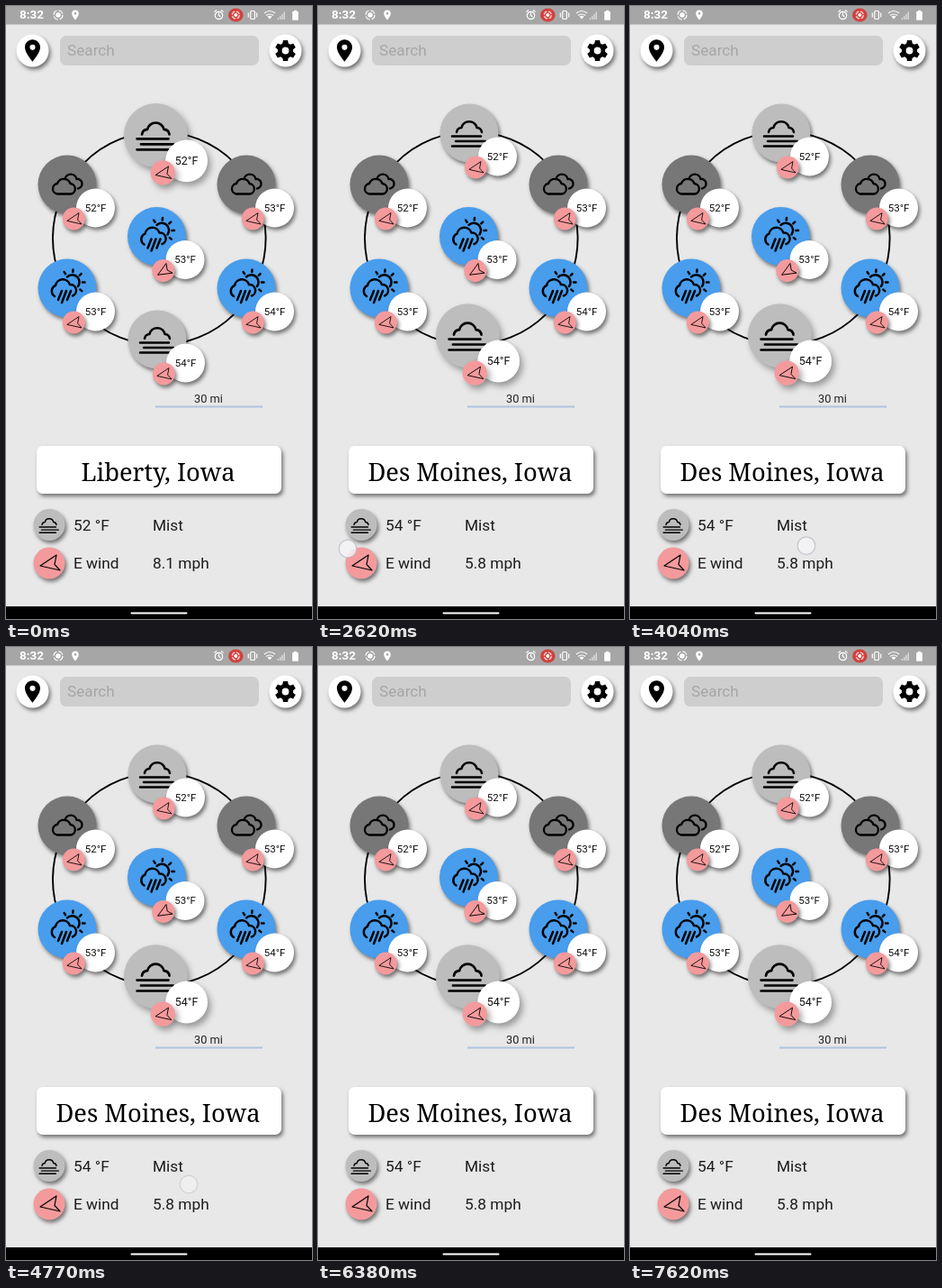
Write an HTML page that moves like this. It is 340 by 680 pixels and loops after 8000 ms.

```html
<!DOCTYPE html>
<html lang="en">
<head>
<meta charset="utf-8">
<style>
  html, body { margin: 0; width: 100%; height: 100%; overflow: hidden; background: #e8e8e8; }
  svg { display: block; width: 340px; height: 680px; font-family: Roboto, sans-serif; }
  .line { fill: none; stroke: #000; stroke-linecap: round; stroke-linejoin: round; }
  .raised { filter: drop-shadow(2px 3px 2px rgba(0, 0, 0, .5)); }
  .tiny { fill: none; stroke: #fff; stroke-width: 1.2; }
  .temp { font-size: 11.5px; text-anchor: middle; fill: #111; }
  .row { font-size: 17.3px; fill: #1c1c1c; }
</style>
</head>
<body>
<svg id="stage" viewBox="0 0 340 680"></svg>
<script>
const LOOP = 8000;
const stage = document.getElementById('stage');

const clamp = v => Math.max(0, Math.min(1, v));
const smooth = v => { v = clamp(v); return v * v * (3 - 2 * v); };
const mix = (a, b, k) => a + (b - a) * k;

const at = (x, y, body, scale = 1) => `<g transform="translate(${x} ${y}) scale(${scale})">${body}</g>`;
const disc = (x, y, r, fill, cls = 'raised') => `<circle cx="${x}" cy="${y}" r="${r}" fill="${fill}" class="${cls}"/>`;
const line = (d, width = 2.5) => `<path class="line" stroke-width="${width}" d="${d}"/>`;

function sunRays() {
  let d = '';
  for (let i = 0; i < 5; i++) {
    const a = (-125 + i * 41) * Math.PI / 180;
    const c = Math.cos(a), s = Math.sin(a);
    d += `M${5 + 12 * c} ${-6 + 12 * s}L${5 + 14.5 * c} ${-6 + 14.5 * s}`;
  }
  return d;
}

const icons = {
  mist: line('M-14 -1A6 6 0 0 1 -8.5 -6A8.7 8.7 0 0 1 8.5 -6A6 6 0 0 1 14 -1') +
        line('M-19 3.5H13M-15 9H18M-19 14.5H13'),
  clouds: line('M-11 10.5A5.8 5.8 0 0 1 -11 -1A7.7 7.7 0 0 1 3.5 -1A5.8 5.8 0 0 1 4 10.5Z', 2.3) +
          line('M-2.5 -6A6.6 6.6 0 0 1 10.5 -6A5.3 5.3 0 0 1 12 4.5', 2.3),
  rain: line(sunRays()) + line('M0 -12.5A8 8 0 0 1 12 -2') +
        line('M-14 9A6.8 6.8 0 0 1 -13 -3A8.3 8.3 0 0 1 3 -4A6.5 6.5 0 0 1 6 8.5') +
        line('M-6 3L-10 13M-1 3L-6 16M4 3L0 13')
};
const tint = { mist: '#bdbdbd', clouds: '#777', rain: '#489ded' };

const wind = (r, turn = 0) => disc(0, 0, r, '#f49a9c') +
  `<g transform="scale(${r / 17.5}) rotate(${turn})">${line('M-10 3L8 -9L6 1.5L12 8Z', 1.2)}</g>`;

const pin = 'M12 2C8.1 2 5 5.1 5 9c0 5.25 7 13 7 13s7-7.75 7-13c0-3.9-3.1-7-7-7z' +
  'm0 9.5a2.5 2.5 0 0 1 0-5 2.5 2.5 0 0 1 0 5z';
const pinIcon = (x, y, scale, fill) => at(x, y, `<path transform="translate(-12 -12)" fill="${fill}" d="${pin}"/>`, scale);

function gear() {
  let teeth = '';
  for (let i = 0; i < 6; i++) {
    teeth += `<path d="M-3.5 -6L-2.6 -11.5H2.6L3.5 -6Z" transform="rotate(${i * 60})"/>`;
  }
  return teeth + '<circle r="6.3" fill="none" stroke="#000" stroke-width="4.8"/>';
}

const spots = [
  { x: 168, y: 141, kind: 'mist', temp: 52, id: 'north' },
  { x: 68, y: 198, kind: 'clouds', temp: 52 },
  { x: 267, y: 198, kind: 'clouds', temp: 53 },
  { x: 167.5, y: 255.5, kind: 'rain', temp: 53, turn: -20 },
  { x: 68, y: 313, kind: 'rain', temp: 53 },
  { x: 267, y: 313, kind: 'rain', temp: 54 },
  { x: 168, y: 370, kind: 'mist', temp: 54, id: 'south' }
];

const spot = s => `<g id="${s.id || ''}" transform="translate(${s.x} ${s.y})">
  ${disc(0, 0, 32.5, tint[s.kind])}${icons[s.kind]}
  ${disc(31.5, 26, 21.5, '#fff')}
  <text class="temp" x="31.5" y="29.5">${s.temp}°F</text>
  ${at(7.3, 38, wind(12.5, s.turn))}</g>`;

const statusBar = `<rect width="340" height="20.5" fill="#a6a6a6"/>
  <text x="15" y="14" font-size="13.5" font-weight="700" fill="#fff">8:32</text>
  <circle class="tiny" cx="58" cy="10" r="5" stroke-dasharray="5.8 2"/>${disc(58, 10, 2.8, '#fff', '')}
  ${pinIcon(77, 10, .55, '#fff')}
  <circle class="tiny" cx="236.5" cy="10.5" r="4.2"/>
  <path class="tiny" d="M236.5 7.5V10.5L238.5 12M231.5 6.5L234 4.5M241.5 6.5L239 4.5"/>
  <ellipse cx="255.3" cy="10" rx="8.3" ry="7.6" fill="#d2413e"/>
  <circle class="tiny" cx="255.3" cy="10" r="4" stroke-width=".9" stroke-dasharray="4.7 1.6" opacity=".8"/>${disc(255.3, 10, 2, '#fff', '')}
  <rect class="tiny" x="271.8" y="5.5" width="4.6" height="9" rx="1"/>
  <path class="tiny" d="M269.3 7.5V12.5M278.7 7.5V12.5"/>
  <path class="tiny" d="M287 8Q293 3 299 8M289 10.5Q293 7.5 297 10.5"/>
  <path d="M290.5 11.7Q293 10 295.5 11.7L293 14.5Z" fill="#fff"/>
  <path class="tiny" d="M302.5 15V13M304.8 15V11M307 15V9M309.2 15V6.5" opacity=".7"/>
  <path d="M318.2 6H320V4.8H323V6H324.8V15.8H318.2Z" fill="#fff"/>`;

stage.innerHTML = `<rect width="340" height="680" fill="#e8e8e8"/>${statusBar}
  ${disc(29.5, 49.5, 18, '#fff')}${pinIcon(29.5, 49.5, 1.22, '#000')}
  <rect x="60" y="33" width="221" height="33" rx="7" fill="#cecece"/>
  <text x="68" y="55" font-size="17.2" fill="#a6a6a6">Search</text>
  ${disc(310.5, 49.5, 18, '#fff')}${at(310.5, 49.5, gear())}
  <circle cx="170.3" cy="257.7" r="118.3" fill="none" stroke="#000" stroke-width="1.9"/>
  ${spots.map(spot).join('')}
  <text x="225" y="440" font-size="12.8" text-anchor="middle" fill="#222">30 mi</text>
  <path d="M166 444.5H285" stroke="#b0c4de" stroke-width="2"/>
  <rect class="raised" x="34" y="488" width="272" height="53" rx="7" fill="#fff"/>
  <text id="city" x="169" y="526.5" font-family="'Roboto Slab', 'Noto Serif', serif" font-size="27.3" text-anchor="middle"></text>
  ${disc(48, 575.5, 17.5, '#bdbdbd')}${at(48, 576, icons.mist, .57)}
  ${at(48, 618, wind(17.5))}
  <text id="degrees" class="row" x="75" y="582"></text>
  <text class="row" x="163" y="582">Mist</text>
  <text class="row" x="75" y="624">E wind</text>
  <text id="speed" class="row" x="163" y="624"></text>
  <circle id="touch" r="9.8" fill="#f4f4f6" fill-opacity=".82" stroke="#b9bcc4" stroke-opacity=".8" stroke-width="1.2"/>
  <rect y="666" width="340" height="14"/>
  <path d="M139.5 673.5H200.5" stroke="#fff" stroke-width="2" stroke-linecap="round"/>`;

const byId = id => document.getElementById(id);
const north = byId('north'), south = byId('south'), touch = byId('touch');

// Selected spots grow, shift a little and cast a wider shadow.
function pose(node, x, y, dx, dy, k) {
  node.setAttribute('transform', `translate(${x + dx * k} ${y + dy * k}) scale(${mix(1, 1.09, k)})`);
  const shadow = `drop-shadow(${mix(2, 3, k)}px ${mix(3, 4, k)}px ${mix(2, 3.5, k)}px rgba(0,0,0,${mix(.5, .35, k)}))`;
  for (const c of node.querySelectorAll('.raised')) c.style.filter = shadow;
}

// Each stroke: [time, x, y] stops, then the fade interval.
const strokes = [
  { path: [[2620, 33, 602], [3230, 116, 599]], fade: [3380, 3690] },
  { path: [[3880, 164, 601], [4110, 205, 598], [4380, 166, 601], [4650, 203, 596]], fade: [4690, 4920] },
  { path: [[5310, 40, 645], [5560, 120, 643], [5820, 61, 648], [6080, 122, 640]], fade: [6190, 6380] },
  { path: [[6620, 162, 642], [7000, 235, 636], [7210, 170, 645], [7420, 226, 646]], fade: [7460, 7620] }
];

function drawTouch(t) {
  const s = strokes.find(({ path, fade }) => t >= path[0][0] && t < fade[1]);
  touch.setAttribute('visibility', s ? 'visible' : 'hidden');
  if (!s) return;
  const next = s.path.findIndex(p => p[0] > t);
  const b = next < 0 ? s.path[s.path.length - 1] : s.path[next];
  const a = next < 0 ? b : s.path[next - 1];
  const k = a === b ? 1 : smooth((t - a[0]) / (b[0] - a[0]));
  touch.setAttribute('cx', mix(a[1], b[1], k));
  touch.setAttribute('cy', mix(a[2], b[2], k));
  touch.setAttribute('opacity', 1 - clamp((t - s.fade[0]) / (s.fade[1] - s.fade[0])));
}

function draw(t) {
  const k = smooth((t - 40) / 230);
  pose(north, 168, 141, -1.7, 2.5, 1 - k);
  pose(south, 168, 370, -1.7, -4.3, k);
  const first = t < 40;
  byId('city').textContent = first ? 'Liberty, Iowa' : 'Des Moines, Iowa';
  byId('degrees').textContent = first ? '52 °F' : '54 °F';
  byId('speed').textContent = first ? '8.1 mph' : '5.8 mph';
  drawTouch(t);
}

let start;
function tick(now) {
  start ??= now;
  draw((now - start) % LOOP);
  requestAnimationFrame(tick);
}
draw(0);
requestAnimationFrame(tick);
</script>
</body>
</html>
```
